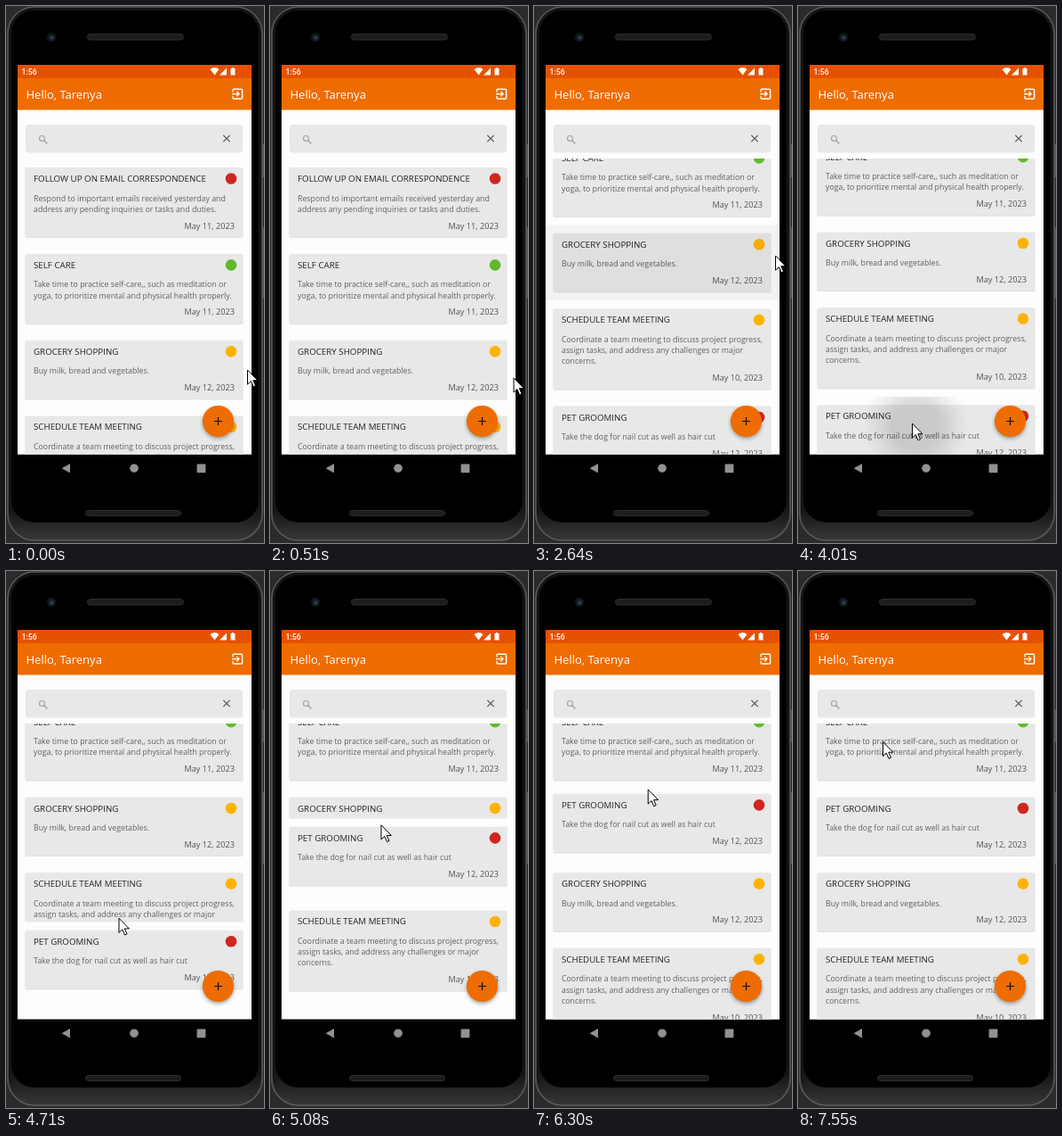
These frames come from a looping animation (290x602 px, 8 s). An HTML page:

```html
<!DOCTYPE html>
<html lang="en">
<head>
<meta charset="utf-8">
<title>Task list</title>
<style>
html, body { margin: 0; width: 100%; height: 100%; overflow: hidden; background: #2b2b2b; }
svg { display: block; width: 290px; height: 602px; font-family: "Open Sans", "Noto Sans", sans-serif; }
.title { font-size: 9.76px; fill: #222; }
.body { font-size: 8.81px; fill: #606060; }
.date { font-size: 9.2px; fill: #525252; text-anchor: end; }
.hello { font-size: 13px; fill: #fff; }
.clock { font: 500 8.8px Roboto, sans-serif; fill: #fff; }
.fab { filter: drop-shadow(0 2px 2px rgba(0, 0, 0, .35)); }
</style>
</head>
<body>
<svg viewBox="0 0 290 602">
  <defs>
    <linearGradient id="chin" x2="0" y2="1">
      <stop offset=".94" stop-color="#141414"/><stop offset="1" stop-color="#383838"/>
    </linearGradient>
    <radialGradient id="ink">
      <stop offset=".45"/><stop offset=".75" stop-opacity=".4"/><stop offset="1" stop-opacity="0"/>
    </radialGradient>
    <clipPath id="view"><rect x="13" y="171" width="263" height="331.5"/></clipPath>
  </defs>

  <!-- phone -->
  <rect width="290" height="602" fill="#2b2b2b"/>
  <path d="M288 155h2v37h-2zM288 248h2v80h-2z" fill="#555"/>
  <rect x="2" y="1" width="286" height="598" rx="30" fill="url(#chin)" stroke="#5a5a5a" stroke-width="1.6"/>
  <rect x="6" y="5" width="278" height="574" rx="26"/>
  <rect x="91.5" y="31.5" width="108" height="6.5" rx="3.2" fill="#1d1d1d" stroke="#2e2e2e"/>
  <rect x="89.5" y="565.5" width="107" height="6" rx="3" fill="#1d1d1d" stroke="#2e2e2e"/>
  <circle cx="51" cy="35" r="5" fill="#15181d"/>
  <circle cx="51.5" cy="35.5" r="2.2" fill="#2a3a58"/>

  <!-- app -->
  <rect x="13" y="66" width="263" height="436.5" fill="#fdfdfd"/>
  <rect x="13" y="66" width="263" height="15" fill="#e65100"/>
  <rect x="13" y="81" width="263" height="35.5" fill="#ef6c00"/>
  <text class="clock" x="17.5" y="76.5">1:56</text>
  <path d="M229.5 71Q234.5 67 239.5 71L234.5 77.5ZM240 77.5L248 69.5V77.5ZM252.5 70h1.3v-1h2.2v1h1.5v7.5h-5Z" fill="#fff"/>
  <text class="hello" x="22.5" y="103.8">Hello, Tarenya</text>
  <path d="M255 96.5V94.2q0-1 1-1h8.6q1 0 1 1v8.8q0 1-1 1H256q-1 0-1-1v-2.3M253.8 98.6h8M259.3 96l2.7 2.6-2.7 2.6" fill="none" stroke="#fff" stroke-width="1.4"/>
  <rect x="22" y="133" width="244" height="31.5" rx="3" fill="#e8e8e8"/>
  <g fill="none">
    <path d="M42.8 150.8l3.6 3.6" stroke="#a0a0a0" stroke-width="1.4"/>
    <circle cx="40.5" cy="148.5" r="3" stroke="#a0a0a0" stroke-width="1.1"/>
    <path d="M244.3 144.8l7.4 7.4m0-7.4l-7.4 7.4" stroke="#555" stroke-width="1.2"/>
  </g>
  <g clip-path="url(#view)"><g id="list"></g></g>
  <circle class="fab" cx="238.5" cy="465.5" r="17.6" fill="#ee6c02"/>
  <path d="M238.5 461v9M234 465.5h9" stroke="#111" stroke-width="1.2"/>

  <!-- navigation bar -->
  <g fill="#929292">
    <path d="M72 513v10.4L62.6 518.2Z"/>
    <circle cx="144" cy="518.2" r="4.8"/>
    <rect x="214.6" y="513.4" width="9.8" height="9.8" rx=".6"/>
  </g>

  <path id="cursor" d="M0 0V16.2L3.8 12.6L6.5 18.8L9 17.7L6.3 11.7H11.4Z" fill="#fff" stroke="#000" stroke-linejoin="round"/>
</svg>
<script>
const LOOP = 8000, TICK = 135.75, LEAD = 80; // the screen refreshes once per tick
const MARGIN = 9.35, LINE = 12.25, MIDDLE = 144.5;
const RED = '#cf2620', GREEN = '#62b92c', AMBER = '#ffb300';
const NS = 'http://www.w3.org/2000/svg';
const GROCERY = 2, MEETING = 3, PET = 4;

const tasks = [
  ['FOLLOW UP ON EMAIL CORRESPONDENCE', RED, 'May 11, 2023',
    'Respond to important emails received yesterday and', 'address any pending inquiries or tasks and duties.'],
  ['SELF CARE', GREEN, 'May 11, 2023',
    'Take time to practice self-care,, such as meditation or', 'yoga, to prioritize mental and physical health properly.'],
  ['GROCERY SHOPPING', AMBER, 'May 12, 2023', 'Buy milk, bread and vegetables.'],
  ['SCHEDULE TEAM MEETING', AMBER, 'May 10, 2023',
    'Coordinate a team meeting to discuss project progress,', 'assign tasks, and address any challenges or major', 'concerns.'],
  ['PET GROOMING', RED, 'May 12, 2023', 'Take the dog for nail cut as well as hair cut']
];

// Smooth 0..1 progress of tick n between ticks a and b
function ease(n, a, b) {
  const f = Math.min(1, Math.max(0, (n - a) / (b - a)));
  return f * f * (3 - 2 * f);
}
const mix = (a, b, f) => a + (b - a) * f;

function set(el, attrs) {
  for (const k in attrs) el.setAttribute(k, attrs[k]);
}

function add(parent, tag, attrs, text) {
  const el = document.createElementNS(NS, tag);
  set(el, attrs);
  if (text) el.textContent = text;
  return parent.appendChild(el);
}

const cardHeight = lines => 53.7 + LINE * lines;
const list = document.getElementById('list');
const cursor = document.getElementById('cursor');
let nextTop = 181;

const cards = tasks.map(([title, color, date, ...lines], i) => {
  const h = cardHeight(lines.length);
  const g = add(list, 'g', {});
  const row = { x: 13, y: -MARGIN, width: 263, height: h + 2 * MARGIN };
  const box = { x: 21.6, width: 244.8, height: h, rx: 1.5 };
  add(g, 'rect', { ...row, fill: '#fdfdfd' });
  add(g, 'rect', { ...box, y: .6, fill: '#d8d8d8' });
  add(g, 'rect', { ...box, y: 0, fill: '#e8e8e8' });
  add(g, 'text', { class: 'title', x: 31, y: 16 }, title);
  add(g, 'circle', { cx: 253, cy: 12.5, r: 6.3, fill: color });
  lines.forEach((s, j) => add(g, 'text', { class: 'body', x: 31, y: 37.5 + LINE * j }, s));
  add(g, 'text', { class: 'date', x: 257, y: 44 + LINE * lines.length }, date);
  add(add(g, 'clipPath', { id: 'row' + i }), 'rect', row);
  const ink = add(add(g, 'g', { 'clip-path': `url(#row${i})` }), 'circle', { fill: 'url(#ink)' });
  const card = { g, ink, top: nextTop };
  nextTop += row.height;
  return card;
});

const SCROLL = 121.3;
const petPitch = cardHeight(1) + 2 * MARGIN;
const slot = cards[GROCERY].top - SCROLL;

// Pointer moves: start tick, end tick, x, y
const moves = [
  [0, 3, 274, 417], [14.4, 20, 271.5, 280], [21, 26, 128.5, 468],
  [31, 42, 123.5, 206], [44, 52, 138.5, 329], [52, 55.5, 95.5, 191.5]
];

function pointer(n) {
  let x = 271.5, y = 408;
  for (const [a, b, tx, ty] of moves) {
    const f = ease(n, a, b);
    x = mix(x, tx, f);
    y = mix(y, ty, f);
  }
  return [x, y];
}

function cardTop(i, n) {
  const y = cards[i].top - SCROLL * ease(n, 15.3, 20.3);
  if (i === GROCERY) return y + petPitch * ease(n, 38, 40);
  if (i === MEETING) return y + petPitch * ease(n, 37, 39);
  if (i !== PET) return y;
  const lifted = mix(y, 187.4, ease(n, 32.5, 42));
  return mix(lifted, slot, ease(n, 44, 47.5));
}

// The touch ink spreads from the press point towards the row's middle, then fades
const presses = [
  { card: GROCERY, at: 14.85, x: 273, y: 41, fade: 18.3, end: 21 },
  { card: PET, at: 29, x: 128, y: 22, fade: 32, end: 34 }
];

function drawInk({ card, at, x, y, fade, end }, n) {
  const age = Math.max(0, n - at), f = ease(age, 0, 3);
  set(cards[card].ink, {
    cx: mix(x, MIDDLE, f), cy: mix(y, 24, f),
    r: 60 * Math.min(age, 3) ** 3,
    opacity: .13 * (1 - ease(n, fade, end))
  });
}

function draw(ms) {
  const n = Math.floor((ms % LOOP + LEAD) / TICK);
  cards.forEach(({ g }, i) => set(g, { transform: `translate(0 ${cardTop(i, n).toFixed(2)})` }));
  presses.forEach(p => drawInk(p, n));
  set(cursor, { transform: `translate(${pointer(n)})` });
}

const start = performance.now();
function frame() {
  draw(performance.now() - start);
  requestAnimationFrame(frame);
}
draw(0);
requestAnimationFrame(frame);
</script>
</body>
</html>
```
